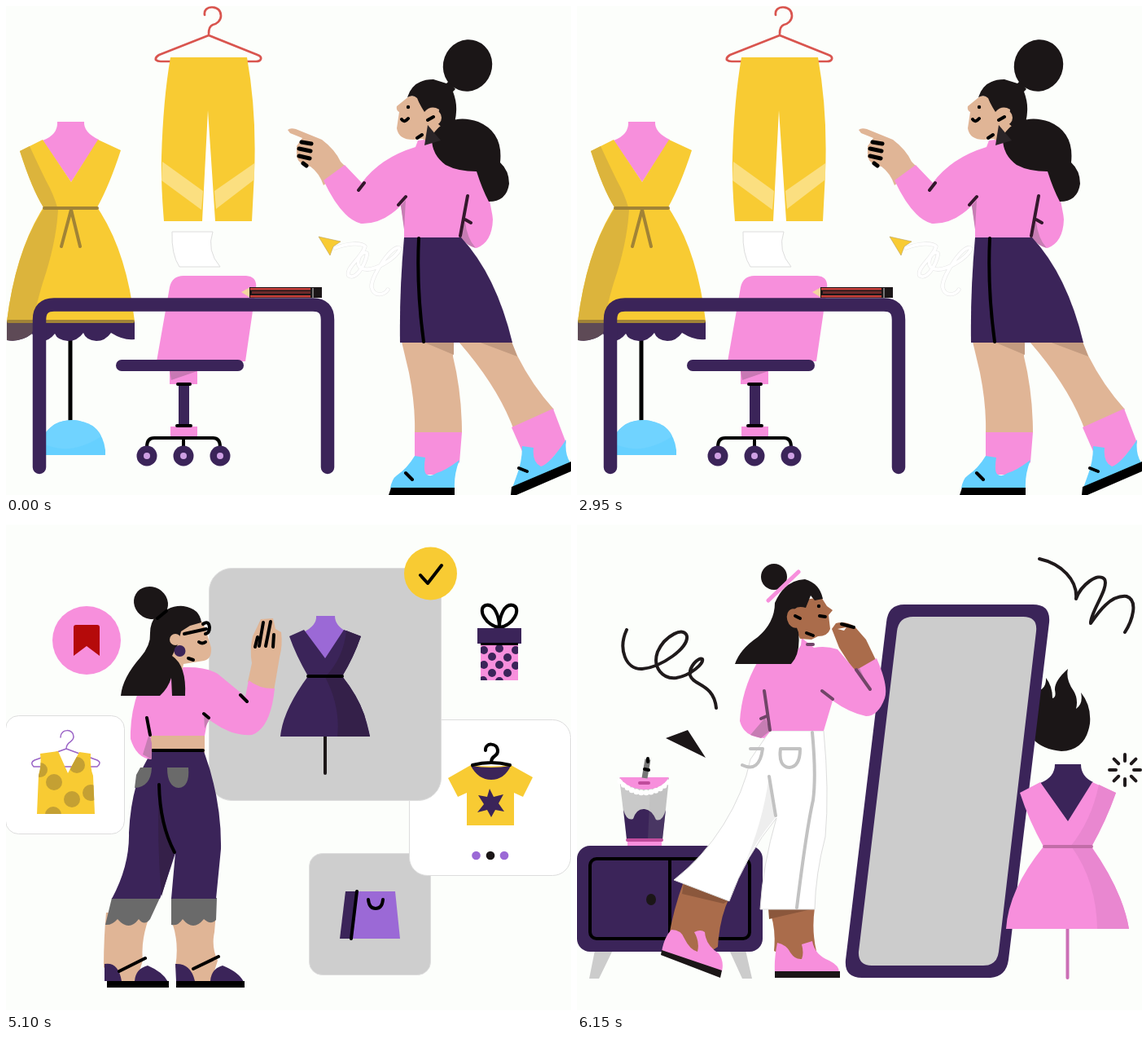
An HTML page that plays this animation: 694 px wide and 600 px high, repeating every 9 s.

```html
<!DOCTYPE html>
<html lang="en">
<head>
<meta charset="utf-8">
<title>Fashion studio</title>
<style>
html, body { margin: 0; width: 100%; height: 100%; overflow: hidden; background: #fcfefb; }
svg { display: block; width: 100%; height: 100%; }
.y { fill: #f8cb33 } .p { fill: #f78fdc } .d { fill: #3b2459 } .v { fill: #9b69d6 }
.k { fill: #1b1617 } .s { fill: #e0b596 } .b { fill: #66d0ff } .w { fill: #fff }
.g { fill: #cecece } .n { fill: #aa6c4b } .o { fill: #c4a033 } .r { fill: #6a6a6a }
.l { fill: none; stroke: #000; stroke-width: 4; stroke-linecap: round; stroke-linejoin: round }
.e { stroke: #ddd; stroke-width: 1 }
</style>
</head>
<body>
<svg viewBox="0 0 694 600" preserveAspectRatio="none">
<defs>
  <clipPath id="tank"><path d="M42 283L64 280 76 307 90 281 104 283Q103 300 107 310L109 357H38L40 310Q44 297 42 283Z"/></clipPath>
  <clipPath id="box"><path d="M583 149H629V193H583Z"/></clipPath>
  <path id="curl" d="M404 297C420 291 436 290 441 295C438 308 416 322 421 331C432 338 445 308 443 303C434 300 428 318 437 322C452 328 480 308 484 298C478 288 448 330 449 345C452 358 466 354 469 348"/>
</defs>

<g class="scene">
  <!-- trousers on hanger -->
  <path class="l" style="stroke:#d9554f;stroke-width:2.700" d="M244 11C243 5 247 1.500 253 1.500C260 1.500 264 6 264 12C264 18 259 22 254 23Q249 25 249 34M249 36L188 60Q183 63 184 66Q186 68 190 68H307Q312 68 313 65Q314 62 309 60Z"/>
  <path class="w" d="M247 126L240 264H258Z"/>
  <path class="y" d="M202 63H296Q308 130 305 205L302 264H257L248 128 241 264H194Q190 215 191 185Q193 115 202 63Z"/>
  <path fill="#fbdf80" d="M192 191L242 227 240 250 191 214ZM305 193V213L258 249 256 227Z"/>
  <path class="w e" d="M204 277H254Q246 300 263 320H213Q203 305 204 277Z"/>
  <!-- dress on stand -->
  <path class="l" style="stroke-width:5" d="M79 411V508"/>
  <path class="b" d="M48 551V527Q56 508 82 508Q118 511 122 545V551Z"/>
  <path fill="#70d3ff" d="M48 524Q60 508 84 508Q110 511 117 528Q80 552 48 538Z"/>
  <path class="p" d="M63 142H96Q95 155 114 164L80 216 45 165Q64 158 63 142Z"/>
  <path class="d" d="M1 387H158V409Q145 411 129 401Q122 411 111 411Q98 410 95 401Q88 411 76 411Q63 410 60 402Q53 411 44 411Q36 410 32 402Q18 413 1 410Z"/>
  <path fill="#5e4a56" d="M1 387H36L32 402Q18 413 1 410Z"/>
  <path class="y" d="M45 164L80 216 113 164 141 177Q127 220 112 247Q148 300 158 387H1Q12 300 46 247Q32 225 17 178Z"/>
  <path fill="#dcb43c" d="M17 178L29 172Q40 196 50 216Q58 230 63 247H46Q32 225 17 178ZM46 249H64Q62 290 45 340Q36 370 34 387H1Q12 300 46 249Z"/>
  <path class="l" style="stroke:#a18336" d="M47 248H112M80 250L68 295M80 250L91 295M3 387H156"/>
  <!-- chair -->
  <path class="p" d="M201 345Q204 331 218 331H295Q309 332 307 347L294 436H185ZM201 448H235V464H201ZM202 516H235V528H202Z"/>
  <path fill="#c878b4" d="M201 448H235L203 459Z"/>
  <path class="d" d="M212 464H225V516H212Z"/>
  <path class="l" d="M211 464H226M210 515H227M173 541Q173 530 182 530H254Q263 530 263 541M218 530V541"/>
  <path class="l" style="stroke:#3b2459;stroke-width:14" d="M142 441H285"/>
  <g class="d"><circle cx="173" cy="552" r="12.500"/><circle cx="218" cy="552" r="12.500"/><circle cx="263" cy="552" r="12.500"/></g>
  <g fill="#cfa0e4"><circle cx="173" cy="552" r="4"/><circle cx="218" cy="552" r="4"/><circle cx="263" cy="552" r="4"/></g>
  <!-- table and pencil -->
  <path class="l" style="stroke:#3b2459;stroke-width:16.500" d="M41 566V385Q41 366.500 59 366.500H377Q395 366.500 395 385V566"/>
  <path fill="#f3d6a0" d="M289 351L300 345V358Z"/>
  <path class="k" d="M299 345H388V358H299Z"/>
  <path fill="#c9403a" d="M300 346H374V348.500H300ZM300 355H374V357.500H300Z"/>
  <path fill="#6b2a2a" d="M302 350H374V353H302Z"/>
  <path fill="#777" d="M376 346H378V358H376Z"/>
  <!-- pointer -->
  <use href="#curl" class="l" style="stroke:#e6e6e6;stroke-width:5"/>
  <use href="#curl" class="l" style="stroke:#fff;stroke-width:3.800"/>
  <path class="y" stroke="#b9a05a" stroke-width=".6" d="M384 283L411 289 402 295 398 306Z"/>
  <!-- pointing woman -->
  <path class="s" d="M486 412H549V430Q560 475 560 524H502Q503 490 495 450ZM556 412H621L628 429Q646 465 673 495L623 518Q604 467 556 412Z"/>
  <path fill="#c39b80" d="M512 412H550V428ZM580 412H621L628 430Z"/>
  <path class="p" d="M502 523H560L557 560 530 575H515L502 560ZM621 517L672 494 688 536 660 567 640 560Z"/>
  <path class="b" d="M480 576Q493 567 502 552L515 554Q512 572 517 575Q522 578 529 573Q540 570 557 557Q550 575 551 592H472Q474 580 480 576ZM627 577Q634 560 634 540L648 542Q646 560 657 565Q668 562 688 532Q686 550 693 560L622 591Z"/>
  <path d="M473 591H551V600H470ZM621 590L694 559V571L627 600H620Z"/>
  <path class="l" d="M491 573L499 581M630 567L640 571"/>
  <path class="s" d="M346 152Q349 149 356 151L388 164Q404 176 411 191L418 198 390 220Q385 205 374 197Q360 195 357 185L357 172 364 162 349 156Z"/>
  <path class="l" style="stroke-width:5" d="M363 167L375 169M360 175L374 178M360 184L373 187M365 193L369 196"/>
  <path class="p" d="M390 214L416 195 437 217Q460 186 503 173L506 165 522 163 577 200Q595 230 598 262Q597 290 578 297Q570 296 558 284H489V270L485 245Q462 268 436 267Q412 261 390 214Z"/>
  <path fill="#c67db3" d="M557 284L564 264Q566 285 577 297Q568 295 557 284ZM485 245L491 238 489 274Z"/>
  <path class="l" style="stroke:#33182c" d="M433 226L440 217M482 244L491 234M567 233L558 282M564 262L571 266"/>
  <path class="d" d="M489 284H559Q602 330 622 413H484Q483 350 489 284Z"/>
  <path class="l" d="M507 285Q504 345 513 412"/>
  <path class="s" d="M496 110L480 123Q479 128 483 130L480 150Q482 164 500 164L512 163 517 166 535 150 530 115Z"/>
  <ellipse class="k" cx="567" cy="73" rx="30" ry="32" transform="rotate(20 567 73)"/>
  <path class="k" d="M493 112Q500 90 525 90L541 95 544 92 552 102 549 105Q554 118 553 130Q552 150 540 153L530 144 532 127Q522 121 514 130Q508 121 505 113Q500 108 493 112ZM543 142Q560 135 580 142Q611 155 607 192Q618 202 618 218Q615 240 593 240Q585 225 578 203Q555 203 540 195Q522 182 523 160Q530 147 543 142Z"/>
  <circle class="s" cx="525" cy="137" r="10"/>
  <path d="M518 146L534 165 514 171Z" fill="#2b2528"/>
  <circle cx="494" cy="124" r="2.200"/>
  <path class="l" d="M486 139Q489 144 494 138M518 140L525 136M505 162L511 158"/>
</g>

<g class="scene">
  <path class="w" d="M0 0H694V2H0ZM0 598H694V600H0Z"/>
  <rect class="g e" x="372.500" y="405.500" width="149" height="149" rx="16"/>
  <rect class="w e" x="495.500" y="241.500" width="198" height="191" rx="22"/>
  <rect class="g e" x="249.500" y="55.500" width="285" height="285" rx="28"/>
  <rect class="w e" x="-.5" y="236.500" width="146" height="145" rx="16"/>
  <circle class="y" cx="521.500" cy="62" r="32.500"/>
  <path class="l" d="M509 64L518 74 535 52"/>
  <circle class="p" cx="99" cy="144" r="42"/>
  <path fill="#b50a0a" d="M86 125H112Q115 125 115 128V163L99 151 83 163V128Q83 125 86 125Z"/>
  <!-- tank top -->
  <path class="l" style="stroke:#9a63c6;stroke-width:1.500" d="M67 263C67 252 83 252 83 262C83 270 74 267 74 277L35 291Q29 294 34 299H112Q118 294 112 291L74 277"/>
  <g clip-path="url(#tank)">
    <path class="y" d="M30 270H120V360H30Z"/>
    <g class="o"><circle cx="42" cy="303" r="9"/><circle cx="59" cy="318" r="10"/><circle cx="87" cy="297" r="10"/><circle cx="104" cy="331" r="10"/><circle cx="81" cy="339" r="10"/><circle cx="58" cy="358" r="10"/></g>
  </g>
  <!-- gift -->
  <path class="l" d="M606 128C590 127 578 105 589 101C600 98 606 115 606 128C606 115 612 98 623 101C634 105 622 127 606 128"/>
  <g clip-path="url(#box)">
    <path class="p" d="M583 149H629V193H583Z"/>
    <g class="d"><circle cx="587" cy="156" r="5"/><circle cx="606" cy="154" r="5"/><circle cx="626" cy="156" r="5"/><circle cx="597" cy="164" r="5"/><circle cx="616" cy="165" r="5"/><circle cx="587" cy="174" r="5"/><circle cx="606" cy="174" r="5"/><circle cx="626" cy="175" r="5"/><circle cx="597" cy="184" r="5"/><circle cx="616" cy="184" r="5"/><circle cx="586" cy="193" r="5"/><circle cx="606" cy="194" r="5"/></g>
  </g>
  <path class="d" d="M579 129H633V148H579Z"/>
  <path d="M583 147H629V150H583Z"/>
  <!-- t-shirt -->
  <path class="y" d="M571 297Q596 300 620 297L647 312 635 336 624 331V371H566V331L555 336 543 313Z"/>
  <path class="d" d="M571 298Q580 315 596 315Q612 315 620 298Q596 302 571 298ZM594 326L599 336 611 333 605 344 612 354 601 352 596 361 591 352 579 355 587 345 580 334 591 336Z"/>
  <path class="l" d="M589 279C588 269 604 269 604 280C604 287 596 285 596 293M573 297Q596 291 619 297"/>
  <circle class="v" cx="577.500" cy="408" r="5.300"/><circle class="k" cx="595" cy="408" r="5.300"/><circle class="v" cx="612" cy="408" r="5.300"/>
  <!-- bag -->
  <path class="d" d="M417 452H431L425 510H410Z"/>
  <path class="v" d="M430 452H478L484 510H424Z"/>
  <path class="l" d="M431 452L424 510M445 462Q446 473 454 473Q462 473 463 462"/>
  <!-- dress form -->
  <path class="l" style="stroke:#1b1617" d="M392 262V307"/>
  <path class="v" d="M381 114H404Q404 126 418 133L392 168 365 134Q382 126 381 114Z"/>
  <path class="d" d="M366 131L392 166 415 131 436 139Q427 165 413 188Q432 212 440 235Q445 250 447 262H337Q340 230 371 188Q356 162 348 139Z"/>
  <path fill="#342049" d="M418 132L436 139Q427 165 413 188Q432 212 440 235L447 262H407Q411 225 392 189Q415 165 418 132Z"/>
  <path class="l" d="M371 188H413"/>
  <!-- shopping woman -->
  <path class="s" d="M123 478H178Q165 510 168 537L160 562H135L120 545Q120 510 123 478ZM204 478H258L256 502Q252 520 260 537L252 562H220L208 545Q213 515 204 490ZM178 258H244V282H178Z"/>
  <path class="d" d="M121 541Q138 538 142 562H121ZM158 562Q159 547 174 543Q193 551 199 563ZM208 541Q227 540 232 562H209ZM251 562Q252 547 266 543Q286 551 292 563Z"/>
  <path d="M124 562H200V570H124ZM209 562H293V570H209Z"/>
  <path class="l" d="M139 550L171 534M230 547L261 532"/>
  <path class="r" d="M130 460H189L177 486Q170 495 163 486Q151 502 137 486Q130 494 122 493ZM203 460H259L258 487Q252 494 243 486Q230 502 217 486Q211 495 203 493Z"/>
  <path class="d" d="M180 280H243Q265 340 264 400L258 461H203L208 405Q197 440 189 461H130Q152 420 151 380Q154 315 180 280Z"/>
  <path fill="#352049" d="M188 322Q190 370 207 405L191 458Q185 390 188 322Z"/>
  <path class="r" d="M160 309L165 300H179Q178 324 158 325ZM198 300H224Q226 324 212 325Q198 324 198 300Z"/>
  <path class="l" d="M180 279H242M188 321Q189 370 207 404"/>
  <path class="s" d="M297 195L302 172Q299 155 303 139L313 118 328 117 331 130 338 134Q340 150 336 165L329 206Q310 205 297 195Z"/>
  <path class="l" d="M306 152L309 140M311 151L316 122M319 151L325 121M328 152L329 137"/>
  <path class="p" d="M218 177Q245 176 260 185L294 213 298 193Q312 204 330 203Q325 252 302 260Q275 262 248 240L244 261H178V290Q160 288 153 265Q152 235 163 205Z"/>
  <path fill="#c67db3" d="M176 258L179 270V290L168 284ZM243 233L250 241 244 252Z"/>
  <path class="l" d="M173 239L177 260M288 211L296 219M243 234L249 239"/>
  <path class="s" d="M218 118L241 121 245 130 252 153Q253 167 243 169L218 173 216 184 205 180 200 145Z"/>
  <g class="k"><ellipse cx="178" cy="98" rx="21.500" ry="19.500" transform="rotate(30 178 98)"/>
  <path d="M185 113L198 106Q208 101 218 102Q238 105 240 122L226 126 215 133 211 149 204 163Q222 175 220 212H204L203 190Q199 203 189 212H141Q143 190 165 165Q178 150 177 135Q177 122 185 113Z"/></g>
  <circle class="s" cx="208" cy="143" r="7"/>
  <circle class="d" cx="213.500" cy="157" r="7"/>
  <path class="l" d="M186 117L197 108M219 136L246 130M242 124Q249 119 250 128Q250 135 245 136M237 146Q241 149 245 146M224 166L230 168"/>
</g>

<g class="scene">
  <path class="w" d="M0 0H694V2H0ZM0 598H694V600H0Z"/>
  <path class="l" style="stroke:#1f1a1b" d="M61 131C50 155 60 180 80 179C104 177 137 153 135 139C132 126 108 138 99 158C92 178 106 192 122 190C140 187 156 172 154 167C149 164 137 177 139 187C143 200 168 197 171 227M568 44C595 50 615 70 613 93C619 76 640 60 648 69C654 80 630 110 631 123C640 110 655 88 675 90C690 95 682 120 673 134"/>
  <path class="k" d="M109 264L136 254 158 288ZM560 207Q577 206 576 190Q584 200 584 215Q589 214 587 205Q586 194 603 179Q600 192 610 206Q616 216 613 228Q622 222 619 208Q632 224 630 246Q625 279 595 280Q572 278 560 265Z"/>
  <path id="spokes" class="l" style="stroke:#1f1a1b" d=""/>
  <!-- cabinet -->
  <path fill="#ccc" d="M22 524H44L27 559H15ZM187 524H207L215 559H203Z"/>
  <rect class="d" y="396" width="228" height="130" rx="16"/>
  <rect class="l" x="16" y="412" width="196" height="98" rx="8"/>
  <path class="l" d="M114 412V510"/>
  <ellipse class="k" cx="91" cy="462" rx="6" ry="7"/>
  <!-- cup -->
  <path fill="#c9c9c9" d="M52 313H113L105 388H61Z"/>
  <path class="d" d="M57 352Q61 366 69 363Q73 350 83 351Q92 352 97 364Q105 367 109 352L105 388H61Z"/>
  <path fill="#999" opacity=".15" d="M90 325L113 313 105 388H87Z"/>
  <path class="l" style="stroke:#fff;stroke-width:7;stroke-dasharray:0 6" d="M53 317Q66 331 83 331Q102 330 112 317"/>
  <path class="p" d="M52 312H113Q104 327 83 327Q62 326 52 312ZM62 389H104V396H62Z"/>
  <path class="l" style="stroke:#c04c9c" d="M77 319H88M62 389H104"/>
  <path class="l" style="stroke:#777;stroke-width:7;stroke-linecap:butt" d="M83 313L87 290"/>
  <path class="l" d="M83 302L88 303M87 289V293"/>
  <!-- mirror -->
  <path class="d" d="M402 100H560Q582 100 580 122L530 536Q527 558 505 558H350Q328 558 330 536L380 122Q382 100 402 100Z"/>
  <path fill="#ccc" d="M413 115H548Q566 115 564 133L518 526Q516 543 499 543H362Q345 543 346 526L393 133Q395 115 413 115Z"/>
  <!-- pink dress -->
  <path class="l" style="stroke:#cb6fb5" d="M602.500 498V558"/>
  <path class="d" d="M587 296H619Q619 311 634 318L603 367 569 319Q587 312 587 296Z"/>
  <path class="p" d="M569 318L603 366 633 318 662 331Q650 365 632 397Q655 430 667 460Q675 480 678 498H527Q530 450 573 397Q555 365 544 331Z"/>
  <path fill="#e987d0" d="M641 321L662 331Q650 365 632 397H606Q632 365 641 321ZM608 398H632Q655 430 667 460Q675 480 678 498H639Q638 440 608 398Z"/>
  <path class="l" style="stroke:#c26da8" d="M574 397H632"/>
  <!-- woman at the mirror -->
  <path class="n" d="M131 440L187 460Q175 485 173 520L150 535 112 512Q118 475 131 440ZM235 472H292Q288 500 294 525L275 542 242 525Q245 495 235 472Z"/>
  <path fill="#8b573c" d="M131 442L187 463 180 467 129 455ZM235 473H292L236 486Z"/>
  <path class="p" d="M116 499Q128 499 132 510Q139 524 148 526Q151 514 144 502Q152 498 157 502Q158 518 174 528Q181 538 178 550L104 526Q107 508 116 499ZM246 515Q257 517 262 527Q268 536 276 535Q279 528 276 517L289 513Q292 530 310 537Q322 543 322 551H243Q242 535 246 515Z"/>
  <path class="k" d="M104 524L178 549 176 558 103 530ZM243 550H323V558H243Z"/>
  <path class="w e" d="M237 255H303Q310 330 305 385Q293 430 292 474H225Q228 420 245 362Q207 408 187 464L119 438Q155 410 180 370Q205 330 213 290Z"/>
  <path fill="#eee" d="M236 310L244 361Q218 392 203 425Q228 370 236 310Z"/>
  <path class="l" style="stroke:#c2c2c2" d="M289 257Q294 310 290 340Q282 375 270 472M236 311L244 359M250 277H274Q274 299 261 300Q247 299 250 277ZM203 297Q224 307 228 277H213"/>
  <path class="n" d="M313 130L318 123Q330 120 341 127L355 143 368 170 342 184 322 153Z"/>
  <path class="w" d="M320 130L331 128 328 132Z"/>
  <path class="l" d="M325 124L340 128"/>
  <path class="p" d="M222 170H262L275 150 276 141 291 153Q305 150 320 155L342 181 368 166Q383 200 378 215Q370 237 355 237Q335 233 314 218L303 255H238L230 264Q205 263 200 243Q202 205 222 170Z"/>
  <path fill="#c67db3" d="M231 239L237 255 226 264 213 260ZM342 181L347 178 360 206Z"/>
  <path class="l" style="stroke:#714568" d="M230 206L237 254M226 240L233 237M301 206L314 216M343 180L360 204M283 149H290"/>
  <path class="n" d="M280 94L300 91 307 102 314 107 309 113 311 130Q308 139 296 139L288 143 274 142 266 125Q255 125 258 105Z"/>
  <g class="k"><circle cx="242" cy="66" r="16"/>
  <path d="M243 98Q255 70 280 69Q298 74 302 93L292 95 287 89 281 104Q266 100 264 113L272 134Q275 160 263 173H194Q200 155 222 140Q243 122 243 98Z"/></g>
  <ellipse class="n" cx="267" cy="117" rx="9" ry="12" transform="rotate(-15 267 117)"/>
  <path class="l" style="stroke:#f78fdc;stroke-width:5" d="M235 95L272 60"/>
  <circle cx="297" cy="102" r="2.200"/>
  <path class="l" d="M298 114L305 115M268 114L274 117M282 135L290 138"/>
</g>
</svg>
<script>
const scenes = document.querySelectorAll('.scene');
const HOLD = 3000;

let rays = '';
for (let i = 0; i < 8; i++) {
  const x = Math.cos(i * Math.PI / 4), y = Math.sin(i * Math.PI / 4);
  rays += `M${673 + 11 * x} ${303 + 11 * y}L${673 + 19 * x} ${303 + 19 * y}`;
}
document.getElementById('spokes').setAttribute('d', rays);

// The three pictures replace one another with hard cuts.
function draw() {
  const now = Math.floor(performance.now() / HOLD) % scenes.length;
  scenes.forEach((g, i) => g.style.display = i === now ? '' : 'none');
  requestAnimationFrame(draw);
}
draw();
</script>
</body>
</html>
```
